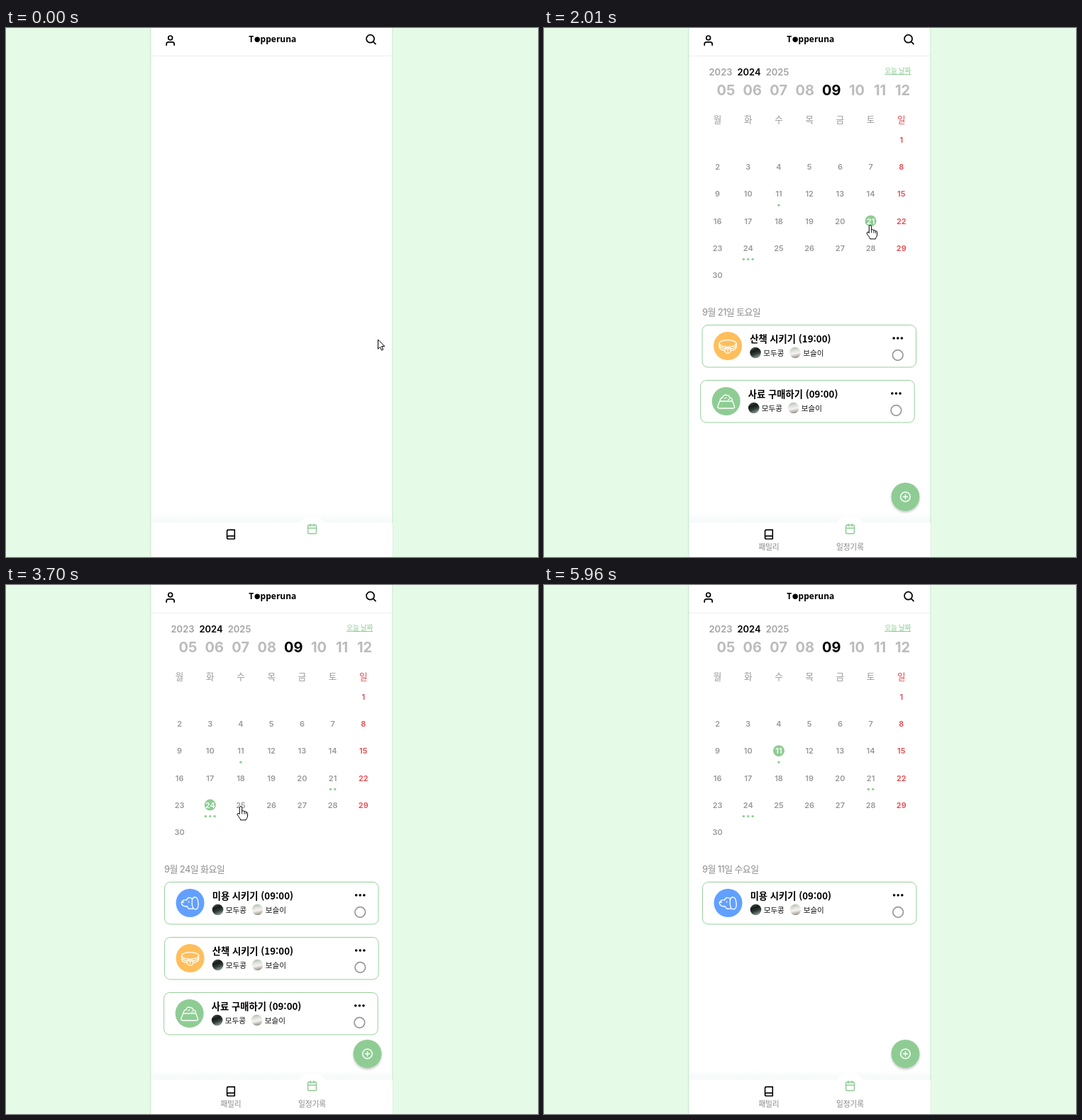
An HTML page for the animation above (6.37 s loop, 750 by 747 pixels).

```html
<!DOCTYPE html>
<html lang="ko">
<head>
<meta charset="utf-8">
<title>Pet calendar</title>
<style>
  html, body { margin: 0; width: 100%; height: 100%; overflow: hidden; background: #e6fbe7; }
  svg { display: block; width: 100%; height: 100%; }
  text { font-family: Inter, "Noto Sans CJK KR", "Noto Sans CJK", sans-serif; }
  .line { fill: none; stroke-linecap: round; stroke-linejoin: round; }
</style>
</head>
<body>
<svg id="stage" viewBox="0 0 750 747">
  <defs>
    <clipPath id="panel"><rect x="204" width="341" height="747"/></clipPath>
    <linearGradient id="navShade" x1="0" y1="0" x2="0" y2="1">
      <stop offset="0" stop-color="#fff"/>
      <stop offset="1" stop-color="#f5f9f9"/>
    </linearGradient>
    <linearGradient id="pet0" x1="0" y1="0" x2=".4" y2="1">
      <stop offset="0" stop-color="#5d6b63"/>
      <stop offset=".4" stop-color="#161b1a"/>
      <stop offset=".7" stop-color="#303b3a"/>
      <stop offset="1" stop-color="#7d8d86"/>
    </linearGradient>
    <linearGradient id="pet1" x1="0" y1="0" x2=".2" y2="1">
      <stop offset="0" stop-color="#a9b8a4"/>
      <stop offset=".4" stop-color="#dfe3dc"/>
      <stop offset=".65" stop-color="#f5f3f0"/>
      <stop offset="1" stop-color="#a39c93"/>
    </linearGradient>
    <filter id="soft" x="-30%" y="-30%" width="160%" height="170%">
      <feDropShadow dx="0" dy="2" stdDeviation="1.6" flood-opacity=".22"/>
    </filter>
  </defs>

  <rect width="750" height="747" fill="#e6fbe7"/>
  <rect x="203.5" y="-2" width="341.5" height="751" fill="#fff" stroke="#bdebc9"/>
  <path d="M204 39.5H545" stroke="#ededed"/>
  <g class="line" stroke="#000" stroke-width="1.7">
    <circle cx="231.7" cy="13.9" r="2.9"/>
    <path d="M226.2 24.2v-1.4q0-2.9 2.9-2.9h5.2q2.9 0 2.9 2.9v1.4"/>
    <circle cx="513.6" cy="15.2" r="5.5"/>
    <path d="M517.7 19.3L521 22.6"/>
  </g>
  <g font-size="12" font-weight="600">
    <text x="342.3" y="20.3" style="font-family:'Noto Sans',sans-serif">T</text>
    <circle cx="354.2" cy="16.2" r="3.7"/>
    <text x="358.6" y="20.3" style="font-family:'Noto Sans',sans-serif">pperuna</text>
  </g>

  <g id="view" clip-path="url(#panel)"></g>

  <rect x="204" y="684" width="341" height="15" fill="url(#navShade)" style="mix-blend-mode:multiply"/>
  <rect x="204" y="698.5" width="341" height="50" fill="#fff"/>
  <circle cx="431.5" cy="711" r="22" fill="#fff"/>
  <g class="line" stroke="#000" stroke-width="1.6">
    <path d="M311.6 719.4V710.6q0-2 2-2h8.7v12.9h-8.7a2 2 0 0 1 0-4.1h8.7"/>
  </g>
  <g class="line" stroke="#8fcc94" stroke-width="1.5">
    <rect x="425.6" y="702" width="11.9" height="12" rx="1.5"/>
    <path d="M425.6 706.2h11.9M429 700.4v3M434.2 700.4v3"/>
  </g>
  <g id="labels" fill="#888" font-size="10.8" text-anchor="middle" letter-spacing="-.2">
    <text x="317" y="737.3">패밀리</text>
    <text x="431.5" y="737.3">일정기록</text>
  </g>
  <g id="add">
    <circle cx="509.5" cy="662" r="20" fill="#8fcc94" filter="url(#soft)"/>
    <g class="line" stroke="#fff" stroke-width="1.5">
      <circle cx="509.5" cy="662" r="6.8"/>
      <path d="M506.4 662h6.2M509.5 658.9v6.2"/>
    </g>
  </g>
  <g id="cursor" fill="#fff" stroke="#000" stroke-linejoin="round">
    <path id="arrow" d="M0 0V13.2L3 10.4 5 15.1 7.2 14.1 5.2 9.5H9.3Z"/>
    <g id="hand">
      <path d="M-1.7 10.5V1.3a1.7 1.7 0 0 1 3.4 0V6.6C2.5 5 5 5.4 5 7.2 6 6 7.6 6.5 7.6 8.1c1-.8 2 0 2 1.2V13c0 3-1.9 3.4-2.2 5.9H-.3C-.5 16.5-3.4 14.3-4.9 11.2-5.3 9.3-3.2 8.8-1.7 10.5Z"/>
      <path class="line" d="M1.7 6.6V10M5 7.4V10.2M7.6 8.2V10.4" stroke-width=".9"/>
    </g>
  </g>
</svg>
<script>
const LOOP = 6370;
const GREEN = '#8fcc94';
const WEEK = '월화수목금토일';
const PETS = ['모두콩', '보슬이'];
const EVENTS = { 11: 1, 21: 2, 24: 3 };
const $ = id => document.getElementById(id);

const TASKS = {
  walk: {
    title: '산책 시키기 (19:00)', color: '#ffbe5c',
    icon: '<ellipse cy="-3.5" rx="12" ry="4.8"/><path d="M-12-3.5V2C-11 5-8 6-4.4 6.6M12-3.5V2C11 5 8 6 4.4 6.6M-11 1C-6 5 6 5 11 1"/><circle cy="6" r="4.2"/><path d="M0 4.4V7.4"/>'
  },
  feed: {
    title: '사료 구매하기 (09:00)', color: GREEN,
    icon: '<path d="M-9 0H9L12 8Q12 10 9 10H-9Q-12 10-12 8ZM-8.5 0C-9-4-6-5-5-5-4-9-1-10 1-8 4-9 5-6 5-5 8-5 9-3 8.5 0M-2-4L0-5M3-2L5-3"/>'
  },
  groom: {
    title: '미용 시키기 (09:00)', color: '#62a0ff',
    icon: '<path d="M3-5C1-9-4-8-5-4-8-5-13-3-12 1-11 5-7 5-4 5-3 8 0 9 4 8M3-5C5-10 10-9 11-3 12 2 12 8 8 9 3 9 2 2 3-5ZM-12-1L-9-1M-2-2V-1"/>'
  }
};

// Each selection: when it is clicked, which day, when its cards start
const PICKS = [
  { from: 80, day: 26, cards: [] },
  { from: 1280, day: 21, start: 1317, cards: ['walk', 'feed'] },
  { from: 2490, day: 24, start: 2653, cards: ['groom', 'walk', 'feed'] },
  { from: 3780, day: 25, cards: [] },
  { from: 4830, day: 11, start: 4870, cards: ['groom'] }
];

// time, x, y of the pointer tip
const PATH = [
  [320, 524.5, 440], [560, 459, 328.5], [720, 459, 328.5], [960, 464, 296],
  [1280, 461, 280], [2010, 460, 279], [2330, 292, 315], [3060, 292, 315],
  [3140, 312, 304], [3220, 331, 313], [4110, 331, 313], [4350, 340, 272],
  [4590, 332.5, 238], [5240, 332.5, 238], [5400, 345, 287], [5880, 658, 735],
  [5960, 700, 790]
];

const text = (x, y, str, size, fill, weight = 400, extra = '') =>
  `<text x="${x}" y="${y}" font-size="${size}" fill="${fill}" font-weight="${weight}" ${extra}>${str}</text>`;
const disc = (x, y, r, fill) => `<circle cx="${x}" cy="${y}" r="${r}" fill="${fill}"/>`;
const MID = 'text-anchor="middle"';
const column = day => (day + 5) % 7;
const colX = i => 244.6 + 43.2 * i;

function heading() {
  const years = [2023, 2024, 2025].map((y, i) =>
    text(249 + 40 * i, 67, y, 13, y === 2024 ? '#000' : '#a3a3a3', 600, MID));
  const months = [256.4, 293.8, 330.7, 367.7, 405.2, 441, 473.5, 505.6].map((x, i) =>
    text(x, 95.2, String(i + 5).padStart(2, '0'), 20, i === 4 ? '#000' : '#bcbcbc', 700, MID));
  const week = [...WEEK].map((w, i) =>
    text(colX(i), 133.8, w, 12.6, i === 6 ? '#e5484d' : '#999', 500, MID));
  const today = text(480.3, 64, '오늘 날짜', 9.8, GREEN, 400, 'letter-spacing="-.4" text-decoration="underline"');
  return [...years, ...months, ...week, today].join('');
}

function days(picked, dots) {
  let out = '';
  for (let d = 1; d <= 30; d++) {
    const c = column(d), x = colX(c), y = 158 + 38.2 * Math.floor((d + 5) / 7);
    const on = d === picked;
    if (on) out += disc(x, y - .2, 8, GREEN);
    out += text(x, y + 3.9, d, 11, on ? '#fff' : c === 6 ? '#e5484d' : '#999', 600, MID);
    const n = dots && EVENTS[d] || 0;
    for (let i = 0; i < n; i++) out += disc(x + (i - (n - 1) / 2) * 6.4, y + 15.8, 1.7, GREEN);
  }
  return out;
}

// Remaining share of the slide-in distance, lightly underdamped
function spring(ms) {
  if (ms <= 0) return 1;
  const p = 7.07 * ms / 1000;
  return Math.exp(-p) * (Math.cos(p) + Math.sin(p));
}

function card(name, i, ms) {
  const rest = spring(ms);
  if (rest > .9) return '';
  const { title, color, icon } = TASKS[name];
  const pets = PETS.map((pet, k) =>
    disc(298.5 + 56 * k, 39.5, 7.8, `url(#pet${k})`) +
    text(309.6 + 56 * k, 43.7, pet, 10.6, '#111')).join('');
  return `<g transform="translate(${70 * rest} ${419 + 78 * i})" opacity="${Math.min(1, 1 - rest)}">
    <rect x="223.5" y=".5" width="301.5" height="59.5" rx="8" fill="#fff" stroke="#96d09b"/>
    ${disc(259.5, 30, 20, color)}
    <g class="line" transform="translate(259.5 30)" stroke="#fff" stroke-width="1.3">${icon}</g>
    ${text(290.6, 25, title, 13.3, '#000', 700, 'style="font-family:\'Noto Sans CJK KR\',\'Noto Sans CJK\',sans-serif"')}
    ${pets}
    ${[493.6, 499.2, 504.8].map(x => disc(x, 19, 1.8, '#000')).join('')}
    <circle cx="499.2" cy="43" r="7.3" fill="none" stroke="#999" stroke-width="1.7"/>
  </g>`;
}

function pointer(t) {
  if (t <= PATH[0][0]) return PATH[0].slice(1);
  const i = PATH.findIndex(k => k[0] >= t);
  if (i < 0) return [900, 900];
  const [t0, x0, y0] = PATH[i - 1], [t1, x1, y1] = PATH[i];
  const p = (t - t0) / (t1 - t0);
  return [x0 + (x1 - x0) * p, y0 + (y1 - y0) * p];
}

function render(t) {
  const pick = PICKS.findLast(p => t >= p.from);
  const show = (id, on) => $(id).setAttribute('visibility', on ? 'visible' : 'hidden');
  let out = '';
  if (pick) {
    const { day, start, cards } = pick;
    out = heading() + days(day, t >= 160) +
      text(223, 406, `9월 ${day}일 ${WEEK[column(day)]}요일`, 13, '#8e8e8e', 400, 'letter-spacing="-.62"') +
      cards.map((name, i) => card(name, i, t - start - 200 * i)).join('');
  }
  $('view').innerHTML = out;
  show('labels', pick);
  show('add', pick);
  const hand = t >= 800 && t < 5480;
  show('hand', hand);
  show('arrow', !hand);
  $('cursor').setAttribute('transform', `translate(${pointer(t)})`);
}

// The picture advances in steps of 80 ms, now and then 90 ms
const stepTime = n => 80 * n + 10 * Math.max(0, Math.floor((n - 6) / 14));
let shown = -1;

function tick() {
  const t = performance.now() % LOOP;
  let n = Math.floor(t / 80);
  while (stepTime(n) > t) n--;
  if (n !== shown) render(stepTime(shown = n));
  requestAnimationFrame(tick);
}
tick();
</script>
</body>
</html>
```
